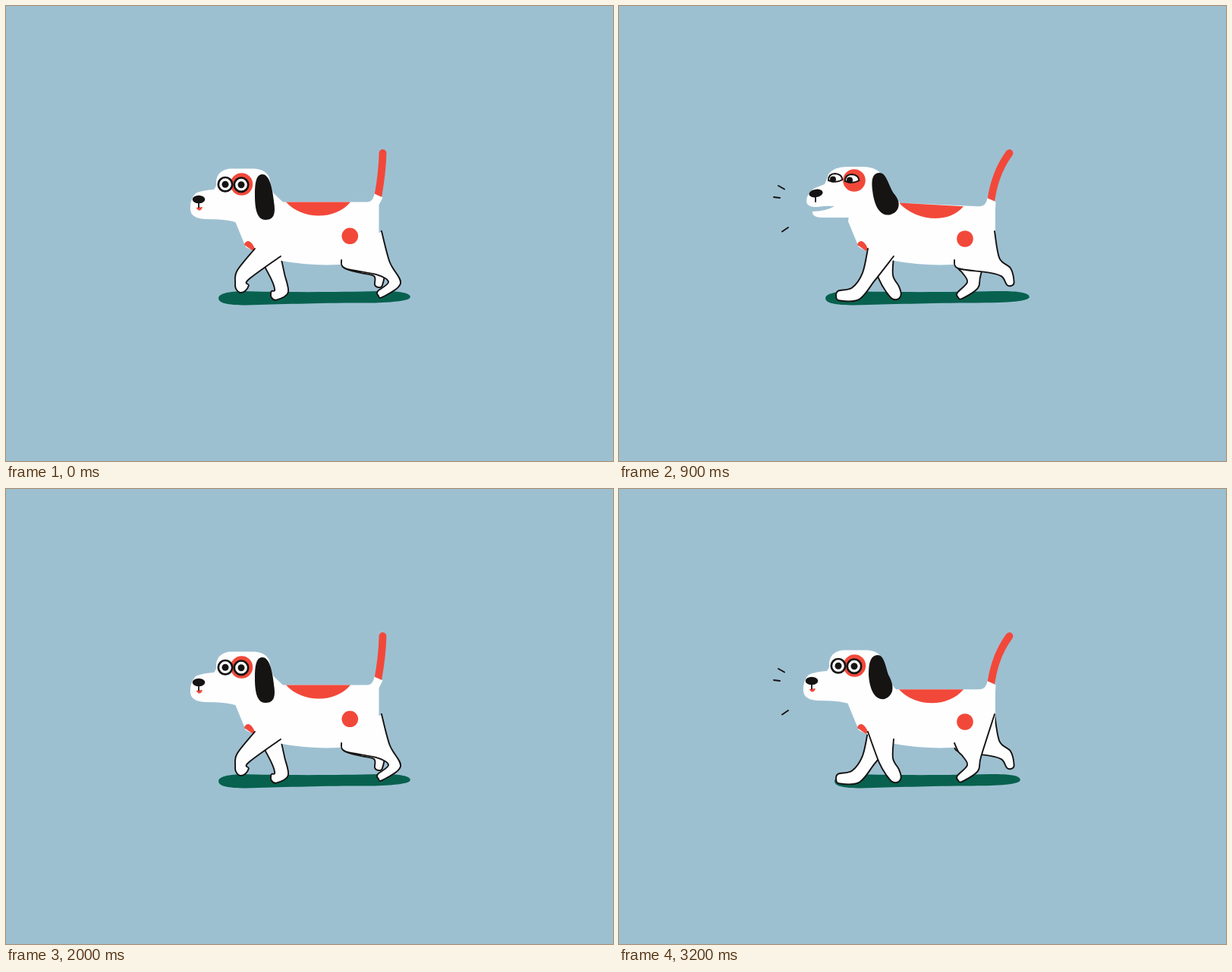
An HTML page that plays this animation: 800 px wide and 600 px high, repeating every 3300 ms.

```html
<!DOCTYPE html>
<html lang="en">
<head>
<meta charset="utf-8">
<title>Walking dog</title>
<style>
html, body { margin: 0; width: 100%; height: 100%; overflow: hidden; background: #9dc0d1; }
svg { display: block; }
</style>
</head>
<body>
<svg id="stage" width="800" height="600" viewBox="0 0 800 600"></svg>
<script>
const WHITE = '#fefefe', RED = '#f2483a', BLACK = '#161313', GREEN = '#08614f', SKY = '#9dc0d1';
const FRAME = 100, FRAMES = 33, STEPS = 8, ROUTINE = 24;
const stage = document.getElementById('stage');

const mix = (a, b, k) => a + (b - a) * k;
const wave = (x, period) => Math.cos(2 * Math.PI * x / period);
const fill = (d, color) => `<path d="${d}" fill="${color}"/>`;
const line = (d, width, color = BLACK) =>
  `<path d="${d}" fill="none" stroke="${color}" stroke-width="${width}" stroke-linecap="round" stroke-linejoin="round"/>`;
const dot = (x, y, r, color) => `<circle cx="${x}" cy="${y}" r="${r}" fill="${color}"/>`;
const nose = (x, y, rx, ry, turn) =>
  `<ellipse rx="${rx}" ry="${ry}" fill="${BLACK}" transform="translate(${x} ${y}) rotate(${turn})"/>`;
const shift = (x, y, content) => `<g transform="translate(${x} ${y})">${content}</g>`;

// Each leg has four key poses (knee, ankle, toe); mids sets how far each in-between has got.
const frontLeg = {
  front: [[328, 320]], hip: [345, 325], back: [362, 330],
  widths: [9.5, 9, 6.5], mids: [.5, .85, .5, .88],
  poses: [
    [[312, 355], [311, 367], [309, 374]],
    [[329, 357], [312, 379], [290, 382]],
    [[358, 356], [363, 376], [353, 382]],
    [[352, 358], [361, 374], [366, 383]]
  ]
};
const hindLeg = {
  front: [[442, 335], [447, 346]], hip: [468, 318], back: [495, 297],
  widths: [12, 8, 5], mids: [.5, .4, .5, .9],
  poses: [
    [[497, 346], [512, 365], [493, 380]],
    [[494, 342], [510, 351], [516, 366]],
    [[477, 345], [492, 352], [491, 368]],
    [[465, 353], [466, 368], [449, 382]]
  ]
};

function legJoints({ poses, mids }, step) {
  const i = Math.floor(step / 2), k = step % 2 ? mids[i] : 0;
  const next = poses[(i + 1) % 4];
  return poses[i].map((p, j) => p.map((v, axis) => mix(v, next[j][axis], k)));
}

// Wraps a smooth outline around the bones.
function legOutline(leg, step) {
  const joints = legJoints(leg, step), left = [], right = [];
  let tip;
  joints.forEach(([x, y], i) => {
    const from = joints[i - 1] || leg.hip, to = joints[i + 1] || [x, y];
    const dx = to[0] - from[0], dy = to[1] - from[1], w = leg.widths[i] / Math.hypot(dx, dy);
    left.push([x - dy * w, y + dx * w]);
    right.unshift([x + dy * w, y - dx * w]);
    tip = [x + dx * w * .6, y + dy * w * .6];
  });
  return spline([...leg.front, ...left, tip, ...right, leg.back]);
}

function spline(pts) {
  let d = `M${pts[0]}`;
  for (let i = 0; i < pts.length - 1; i++) {
    const [a, b, c, e] = [pts[i - 1] || pts[i], pts[i], pts[i + 1], pts[i + 2] || pts[i + 1]];
    d += `C${b.map((v, j) => v + (c[j] - a[j]) / 6)} ${c.map((v, j) => v - (e[j] - b[j]) / 6)} ${c}`;
  }
  return d;
}

function drawLeg(leg, step) {
  const d = legOutline(leg, step % STEPS);
  return fill(d + 'Z', WHITE) + line(d, 1.9);
}

const roundEye = (x, y) =>
  `<circle cx="${x}" cy="${y}" r="9.2" fill="${WHITE}" stroke="${BLACK}" stroke-width="2.7"/>` + dot(x, y, 4.5, BLACK);
const lazyEye = (x, y) =>
  `<path d="M${x - 9},${y + 2}q0,-9 9,-9q9,1 9.5,8q-8,5 -18.5,1z" fill="${WHITE}" stroke="${BLACK}" stroke-width="2"/>` +
  dot(x - 3, y + .5, 4, BLACK);

const restEar = 'M338,222C346,222 351,236 353,258C356,276 352,282 342,282C331,282 328,268 328,250C328,232 330,222 338,222Z';
const flungEar = 'M341,221C349,221 351,234 355,247C363,261 363,274 350,279C336,281 330,264 329,247C329,230 332,221 341,221Z';

function calmHead(ear, tongue) {
  const mouth = tongue
    ? fill('M249,264L258.500,263Q259,274 254,275Q249,274 249,264Z', RED) + line('M253.500,259V270', 1.8)
    : fill('M250.500,266L259,265Q257,271 253,269Z', RED) + line('M254,259V265.500', 1.8);
  return fill('M302,285Q290,281 262,281Q244,280 243,269Q242,255 250,247Q258,243 274,242Q278,238 277,230Q280,215 297,214.500H326Q342,215 347,226Q351,248 357,254V300Z', WHITE) +
    dot(310.5, 235, 14.7, RED) + roundEye(289, 235.2) + roundEye(310, 235.7) +
    nose(254, 255, 8.3, 5.2, 0) + mouth + fill(ear, BLACK);
}

const barkHead = () =>
  fill('M303,279H266Q254,278 255,271Q272,271 284,264Q272,263 262,265Q247,266 247,257Q248,246 258,240Q266,237 271,235Q274,229 276,222Q283,212 300,212H324Q341,213 348,225Q356,253 370,259L360,300Z', WHITE) +
  dot(310, 230, 14.8, RED) + lazyEye(285, 228) + lazyEye(307, 229) +
  nose(259.5, 247, 9.2, 5.2, -10) + line('M259,251V258', 1.8) +
  fill('M343,220C352,219 355,236 362,247C373,259 370,273 356,275.500C343,277 336,262 334,243C332,228 335,220 343,220Z', BLACK);

const smileHead = () =>
  fill('M309,293Q290,294 280,300Q266,307 257,301Q251,294 253,281Q256,272 264,267Q266,260 264,252Q265,239 283,232Q302,223 320,223Q337,222 343,236Q350,258 366,261L360,305Z', WHITE) +
  dot(301, 248, 15.3, RED) + line('M272,261.500Q279,256 287,258M293,252.500Q300,246 308,250', 3.2) +
  nose(267.5, 278, 9.5, 5.2, -8) + line('M269,282L270,290M265,290Q277,292 284,283', 2.2) +
  fill('M330,226C339,224 343,241 350,255C358,270 357,281 345,283C333,285 328,270 325,255C320,238 320,227 330,226Z', BLACK);

const barkMarks = () => line('M210,237L218,241.500M204,252L212,253M215,297.500L223,292', 1.9);

// One routine: pant for a stride, smile and bark for a stride, pant again.
function moodAt(beat) {
  if (beat < 8 || beat > 14) return 'pant';
  return beat < 10 ? 'smile' : beat < 13 ? 'bark' : 'alert';
}

// 0 on the high step of a stride, 1 while low.
const dropAt = step => Math.min(1, Math.min(step, STEPS - step) / 2);
const tongueAt = step => step >= 2 && step <= 5;

function drawHead(mood, step) {
  if (mood === 'smile') return smileHead();
  if (mood === 'bark') return barkHead();
  if (mood === 'alert') return shift(0, -2, calmHead(flungEar, false));
  const drop = dropAt(step);
  return shift(2.5 * drop, 4.4 * drop, calmHead(restEar, tongueAt(step)));
}

function drawTorso(mood, step) {
  const drop = dropAt(step), back = mix(258.6, 264.2, drop), rear = mix(491.5, 496, drop);
  const nape = mood === 'bark' ? 259.5 : mood === 'smile' ? 262 : back;
  const chest = mood === 'pant' && tongueAt(step)
    ? 'M315,317Q321,315 326.500,322L325,324.500Z'
    : 'M314,315Q315,310 320,310Q326,313 328,321L325.500,323Z';
  return fill(`M302,284L316,318L326,323L345,332L363,336Q400,343 440,341L470,340L488,331Q${rear},318 ${rear},296V${back + 4}L496.500,${back - 6}L485.500,${back - 11}Q484,${back} 475,${back}L365,${nape}L340,235L305,260Z`, WHITE) +
    fill(`M369,${nape}L454,${back}C434,${back + 24} 391,${nape + 24} 369,${nape}Z`, RED) +
    dot(mix(453.3, 456, drop), mix(303.3, 307, drop), 10.8, RED) + fill(chest, RED);
}

function drawTail(step) {
  const root = mix(250, 255, dropAt(step));
  return line(`M490.500,${root}Q496,219 ${505.5 - 9 * wave(step, 4)},194`, 9.8, RED);
}

function drawShadow(drawing) {
  const stretch = 1.06 - .065 * wave(drawing - 2, 12);
  return `<g transform="translate(406.500 .5) scale(${stretch} 1)">` +
    fill('M-123,385C-123,378 -108,376 -92,375.500C-50,377 30,377 82,375.500C105,375 123,377 123,383C123,389 96,391 60,391C0,391 -45,393 -88,394C-112,394 -123,391 -123,385Z', GREEN) + '</g>';
}

function render(time) {
  const frame = Math.floor(time / FRAME) % FRAMES;
  const drawing = Math.floor(frame * 6 / 5);
  const step = drawing % STEPS, beat = drawing % ROUTINE, mood = moodAt(beat);
  const marks = [10, 11, 14].includes(beat);
  stage.innerHTML = `<rect width="800" height="600" fill="${SKY}"/>` +
    drawShadow(drawing) + drawTail(step) +
    drawLeg(hindLeg, step + 4) + drawLeg(frontLeg, step + 4) +
    drawTorso(mood, step) +
    drawLeg(hindLeg, step) + drawLeg(frontLeg, step) +
    drawHead(mood, step) + (marks ? barkMarks() : '');
}

const start = performance.now();
function tick() {
  render(performance.now() - start);
  requestAnimationFrame(tick);
}
tick();
</script>
</body>
</html>
```
